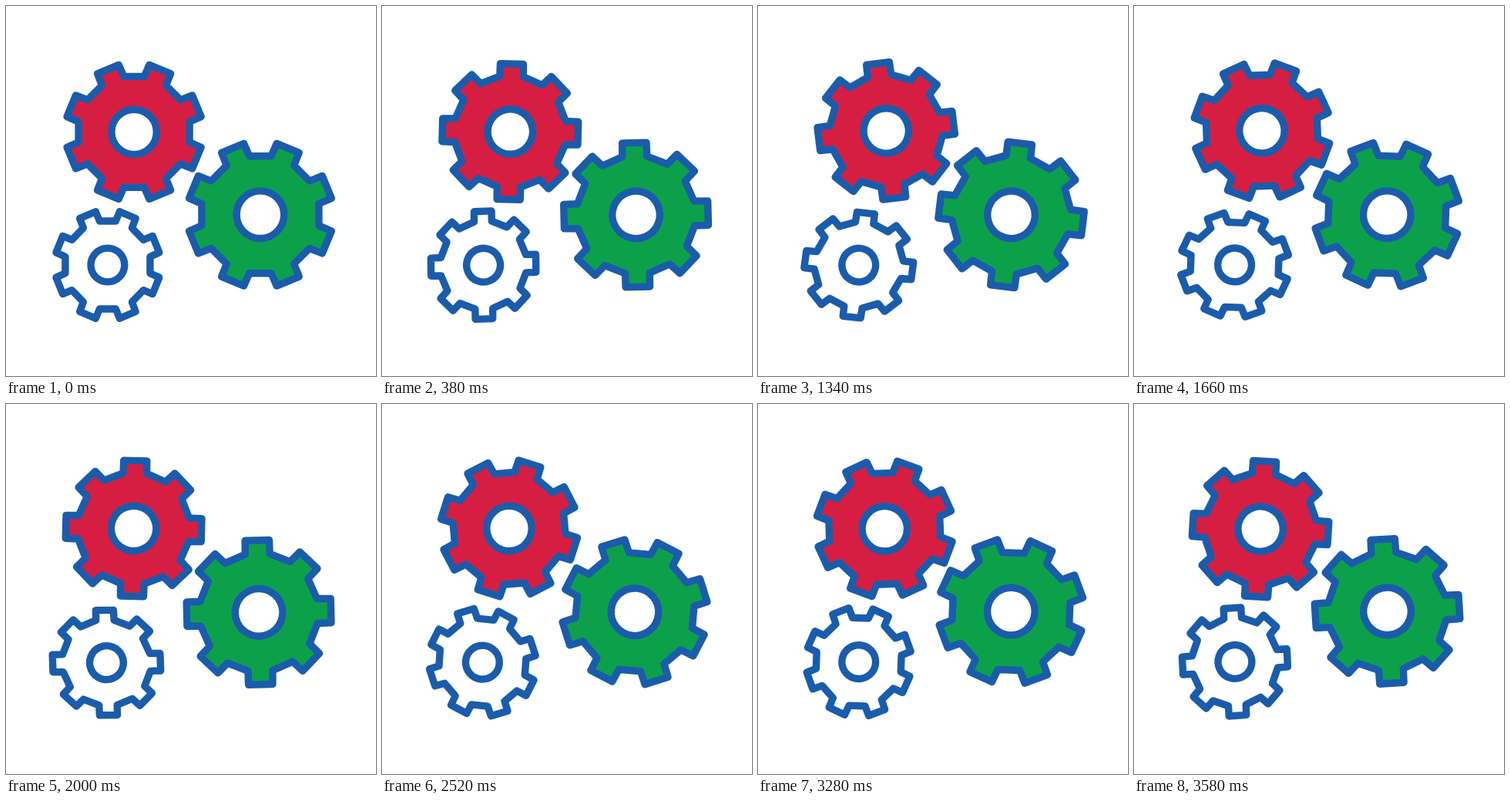
These frames come from a looping animation (480x480 px, 3.6 s). An HTML page with a canvas:

```html
<!DOCTYPE html>
<html lang="en">
<head>
<meta charset="utf-8">
<title>Gears</title>
<style>
  html, body { margin: 0; width: 100%; height: 100%; overflow: hidden; background: #fff; }
  canvas { display: block; }
</style>
</head>
<body>
<canvas id="stage" width="480" height="480"></canvas>
<script>
const ctx = document.getElementById('stage').getContext('2d');
const LOOP = 3600, STEP = 20, TURN = 200, TEETH = 8;

// x, y: pivot; dx, dy: offset of the gear centre from its pivot
const gears = [
  { x: 165.2, y: 162.6, dx: 0.9, dy: 0.8, tip: 88, root: 72, half: 15, hole: 29.2, squeeze: 1, dir: -1, fill: '#d61e42' },
  { x: 329.1, y: 269.9, dx: 0.8, dy: 0.8, tip: 93.5, root: 76, half: 15.7, hole: 30.8, squeeze: 1, dir: 1, fill: '#0da04b' },
  { x: 131.3, y: 335.3, dx: 0.6, dy: 0.7, tip: 70.2, root: 57, half: 11.6, hole: 21.9, squeeze: 0.965, dir: 1, fill: '#fff' }
];

// Straight-sided teeth joined by flat valleys
function gearPath({ tip, root, half, squeeze }) {
  const path = new Path2D();
  const pitch = 2 * Math.PI / TEETH;
  const rootAngle = Math.asin(half / root), tipAngle = Math.atan(half / tip);
  const tipRadius = Math.hypot(tip, half);
  const rootRadius = root / Math.cos(pitch / 2 - rootAngle);
  const corner = (radius, angle) =>
    path.lineTo(radius * Math.cos(angle) * squeeze, radius * Math.sin(angle));
  for (let i = 0; i < TEETH; i++) {
    const axis = (i + 0.5) * pitch;
    corner(rootRadius, axis - rootAngle);
    corner(tipRadius, axis - tipAngle);
    corner(tipRadius, axis + tipAngle);
    corner(rootRadius, axis + rootAngle);
  }
  path.closePath();
  return path;
}

function paint(path, fill) {
  ctx.fillStyle = fill;
  ctx.fill(path);
  ctx.stroke(path);
}

for (const gear of gears) {
  gear.outline = gearPath(gear);
  gear.ring = new Path2D();
  gear.ring.arc(0, 0, gear.hole, 0, 2 * Math.PI);
}

function draw() {
  const time = Math.floor(performance.now() % LOOP / STEP) * STEP;
  const angle = time / LOOP * TURN * Math.PI / 180;
  ctx.fillStyle = '#fff';
  ctx.fillRect(0, 0, 480, 480);
  ctx.strokeStyle = '#1a5cab';
  ctx.lineWidth = 9.4;
  ctx.lineJoin = 'round';
  for (const g of gears) {
    ctx.save();
    ctx.translate(g.x, g.y);
    ctx.rotate(g.dir * angle);
    ctx.translate(g.dx, g.dy);
    paint(g.outline, g.fill);
    paint(g.ring, '#fff');
    ctx.restore();
  }
  requestAnimationFrame(draw);
}
draw();
</script>
</body>
</html>
```
